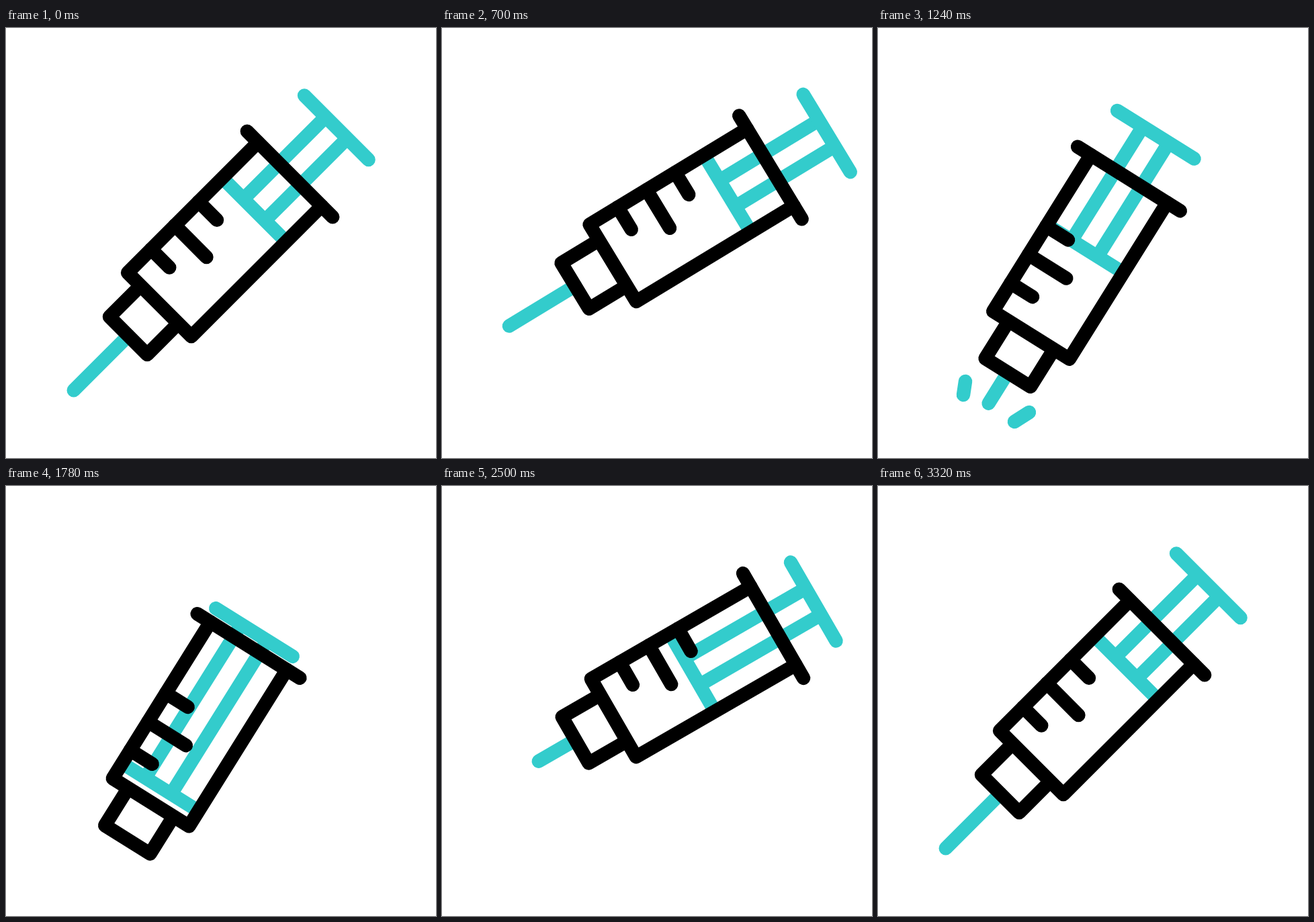
Recreate the animation shown at these times as an HTML page with a canvas. Size 640 by 640 pixels, loop 3.6 s.

```html
<!DOCTYPE html>
<html lang="en">
<head>
<meta charset="utf-8">
<title>Syringe</title>
<style>
  html, body { margin: 0; width: 100%; height: 100%; overflow: hidden; background: #fff; }
  canvas { display: block; width: 640px; height: 640px; }
</style>
</head>
<body>
<canvas id="stage" width="640" height="640"></canvas>
<script>
const ctx = document.getElementById('stage').getContext('2d');
const LOOP = 3600;
const TEAL = '#33cccc';
const BLACK = '#000';

const progress = (t, from, to) => Math.min(1, Math.max(0, (t - from) / (to - from)));
const smooth = x => x * x * (3 - 2 * x);
const easeIn = x => x ** 4;
const easeOut = x => 1 - (1 - x) ** 2;
const mix = (a, b, k) => a + (b - a) * k;

// Flange centre x, y and the tilt of the barrel axis in degrees
const REST = [422.5, 217.5, 45];
const TILTED = [493, 208, 30];
const AIMED = [401, 194.5, 58];
const PRESSED = [361, 238, 58];

const MOVES = [
  [0, 420, REST, TILTED, smooth],
  [430, 1020, TILTED, AIMED, easeIn],
  [1020, 1520, AIMED, PRESSED, easeOut],
  [1790, 2450, PRESSED, TILTED, smooth],
  [2560, 3320, TILTED, REST, smooth]
];

function poseAt(t) {
  const [start, end, a, b, ease] = MOVES.filter(m => m[0] <= t).pop();
  const k = ease(progress(t, start, end));
  return a.map((value, i) => mix(value, b[i], k));
}

// Rises over one span, falls back over the shared return span
const inAndOut = (t, from, to) =>
  smooth(progress(t, from, to)) - smooth(progress(t, 1790, 3000));

function stroke(color, cap, ...points) {
  ctx.strokeStyle = color;
  ctx.lineCap = cap;
  ctx.beginPath();
  points.forEach(([x, y]) => ctx.lineTo(x, y));
  ctx.stroke();
}

function drawSplash(t, inner, outer, end) {
  const head = smooth(progress(t, 1080, 1230));
  const tail = smooth(progress(t, 1260, end));
  if (head <= 0 || tail >= 1) return;
  const at = k => inner.map((value, i) => mix(value, outer[i], k));
  stroke(TEAL, 'round', at(tail), at(head));
}

function drawNeedle(hidden) {
  const tip = -455 + 140 * hidden;
  if (tip < -340) stroke(TEAL, 'round', [-340, 0], [tip, 0]);
}

function drawPlunger(push) {
  const thumb = 98 - 76.5 * push;
  const piston = -75 - 173 * push;
  const shift = -3.5 * push;
  for (const side of [-22.7, 22.7]) {
    stroke(TEAL, 'butt', [piston, side + shift], [thumb, side + shift]);
  }
  stroke(TEAL, 'butt', [piston, shift - 67], [piston, shift + 67]);
  stroke(TEAL, 'round', [thumb, shift - 67.5], [thumb, shift + 67.5]);
}

function drawBarrel() {
  stroke(BLACK, 'round', [0, -67], [-274.4, -67], [-274.4, 67], [0, 67]);
  stroke(BLACK, 'round', [0, -90], [0, 90]);
  stroke(BLACK, 'butt', [-274.4, -39.7], [-340, -39.7], [-340, 39.7], [-274.4, 39.7]);
  for (const [x, end] of [[-125, -28.5], [-175, -0.5], [-225, -28.5]]) {
    stroke(BLACK, 'round', [x, -67], [x, end]);
  }
}

function draw(t) {
  ctx.fillStyle = '#fff';
  ctx.fillRect(0, 0, 640, 640);
  ctx.lineWidth = 20.5;
  ctx.lineJoin = 'round';

  drawSplash(t, [127, 546], [130, 526], 1640);
  drawSplash(t, [203, 586], [225, 572], 1600);

  const [x, y, tilt] = poseAt(t);
  ctx.save();
  ctx.translate(x, y);
  ctx.rotate(-tilt * Math.PI / 180);
  drawNeedle(inAndOut(t, 1040, 1480));
  drawPlunger(inAndOut(t, 950, 1790));
  drawBarrel();
  ctx.restore();
}

const origin = performance.now();
function tick() {
  draw((performance.now() - origin) % LOOP);
  requestAnimationFrame(tick);
}
tick();
</script>
</body>
</html>
```
